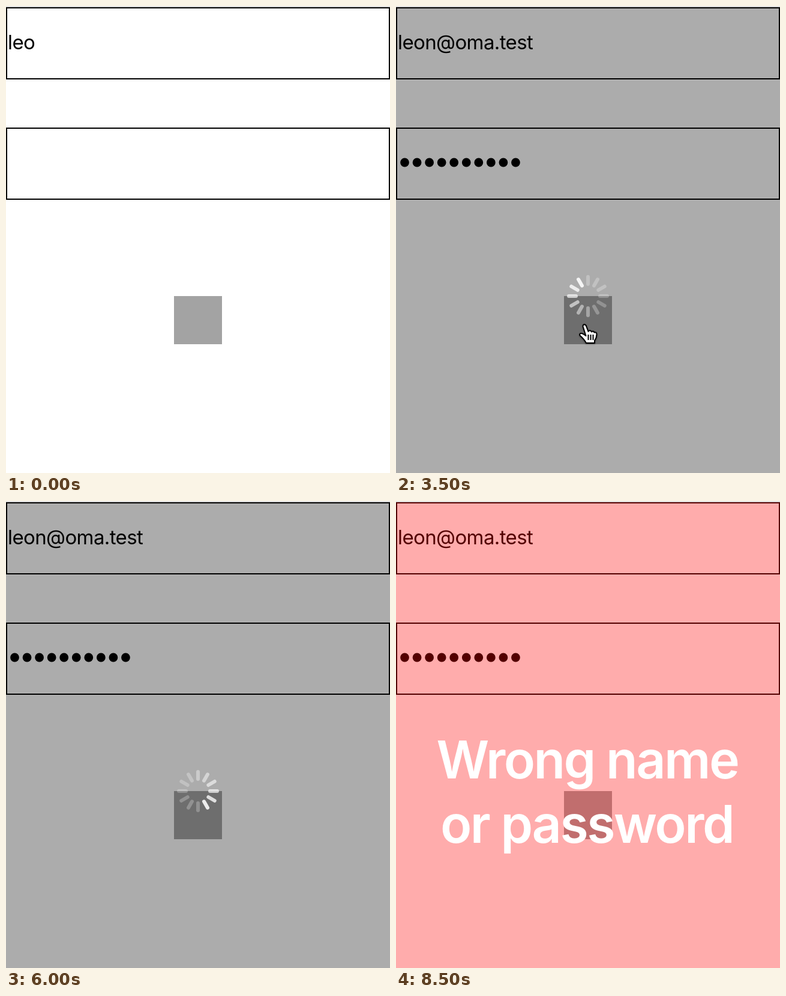
Animation, 640 px wide and 776 px high, one loop 9 s. Source, as an HTML page:

```html
<!DOCTYPE html>
<html lang="en">
<head>
<meta charset="utf-8">
<title>Login form</title>
<style>
  html, body { margin: 0; width: 100%; height: 100%; overflow: hidden; background: #fff; }
  svg { display: block; width: 640px; height: 776px; }
  text { font-family: Inter, Roboto, sans-serif; }
  #email { font-size: 33px; letter-spacing: -0.6px; }
  #error { font-size: 86px; font-weight: 600; letter-spacing: -2.5px; text-anchor: middle; fill: #fff; }
  .field { fill: none; stroke: #000; stroke-width: 2; }
  #spinner { stroke: #fff; stroke-width: 6; stroke-linecap: round; }
  .cursor { filter: drop-shadow(0 1px 1px rgba(0, 0, 0, .4)); stroke-linejoin: round; }
</style>
</head>
<body>
<svg viewBox="0 0 640 776">
  <rect class="field" x="1" y="3" width="638" height="118"/>
  <rect class="field" x="1" y="203" width="638" height="118"/>
  <text id="email" x="3" y="72"></text>
  <g id="dots"></g>
  <rect x="280" y="482" width="80" height="80" fill="#a3a3a3"/>
  <rect id="overlay" y="2" width="640" height="774" fill-opacity=".325"/>
  <rect width="640" height="2" fill="#dedede"/>
  <g id="spinner" transform="translate(320 482)"></g>
  <g id="error">
    <text x="319" y="461">Wrong name</text>
    <text x="318" y="568">or password</text>
  </g>
  <path id="arrow" class="cursor" fill="#000" stroke="#fff" stroke-width="2"
    d="M0 0V27L6 21.5L10.5 32L15 30L10.5 20H19Z"/>
  <g id="hand" class="cursor" stroke="#000" stroke-width="2">
    <path fill="#fff" d="M316.5 548L311.7 533Q311.2 529.2 314 529.2Q316.5 529.2 317.5 533L320.5 541
      Q321.5 538.5 324 539.5Q325.5 540 326 541.5Q328 539.5 330 541.5L330.5 542.5Q334.5 541.5 334.5 545.5
      Q334.5 551 331 556V560H317Q314 554 306.5 547.5Q305.5 544.5 308 544Q311 543.5 316.5 548Z"/>
    <path d="M320.5 546V555M324.5 546V555M328.5 546V555"/>
  </g>
</svg>
<script>
const LOOP = 9000, STEP = 500, BLADES = 12, DOTS = 10;
const EMAIL = "leon@oma.test";
const $ = id => document.getElementById(id);
const show = (el, on) => el.setAttribute("visibility", on ? "visible" : "hidden");

function add(parent, tag, attrs) {
  const el = document.createElementNS(parent.namespaceURI, tag);
  for (const name in attrs) el.setAttribute(name, attrs[name]);
  return parent.appendChild(el);
}

const dots = Array.from({ length: DOTS }, (_, i) =>
  add($("dots"), "circle", { cx: 14.5 + 20.55 * i, cy: 260, r: 7.4 }));
const blades = Array.from({ length: BLADES }, (_, i) =>
  add($("spinner"), "line", { y1: -32, y2: -20, transform: `rotate(${i * 30})` }));

function render(now) {
  // The screen refreshes in hard half-second steps.
  const t = Math.floor((now % LOOP) / STEP) * STEP;
  const loading = t >= 3500 && t < 7500, failed = t >= 7500;

  const typed = t < 500 ? 3 : t < 1000 ? 8 : t < 1500 ? 12 : EMAIL.length;
  $("email").textContent = EMAIL.slice(0, typed);
  const masked = t < 1500 ? 0 : t < 2000 ? 3 : DOTS;
  dots.forEach((dot, i) => show(dot, i < masked));

  show($("overlay"), loading || failed);
  $("overlay").setAttribute("fill", failed ? "#f00" : "#000");
  show($("error"), failed);

  // One turn per second; brightness trails behind the leading blade.
  show($("spinner"), loading);
  const head = 11 + (t - 3500) / 1000 * BLADES;
  blades.forEach((blade, i) => {
    const lag = (((head - i) % BLADES) + BLADES) % BLADES;
    blade.setAttribute("stroke-opacity", Math.max(.25, .88 - .1 * lag));
  });

  show($("arrow"), t >= 2000 && t < 3000);
  $("arrow").setAttribute("transform", t < 2500 ? "translate(372 580)" : "translate(312 529)");
  show($("hand"), t >= 3000 && t < 4500);
}

const start = performance.now();
function tick() {
  render(performance.now() - start);
  requestAnimationFrame(tick);
}
tick();
</script>
</body>
</html>
```
